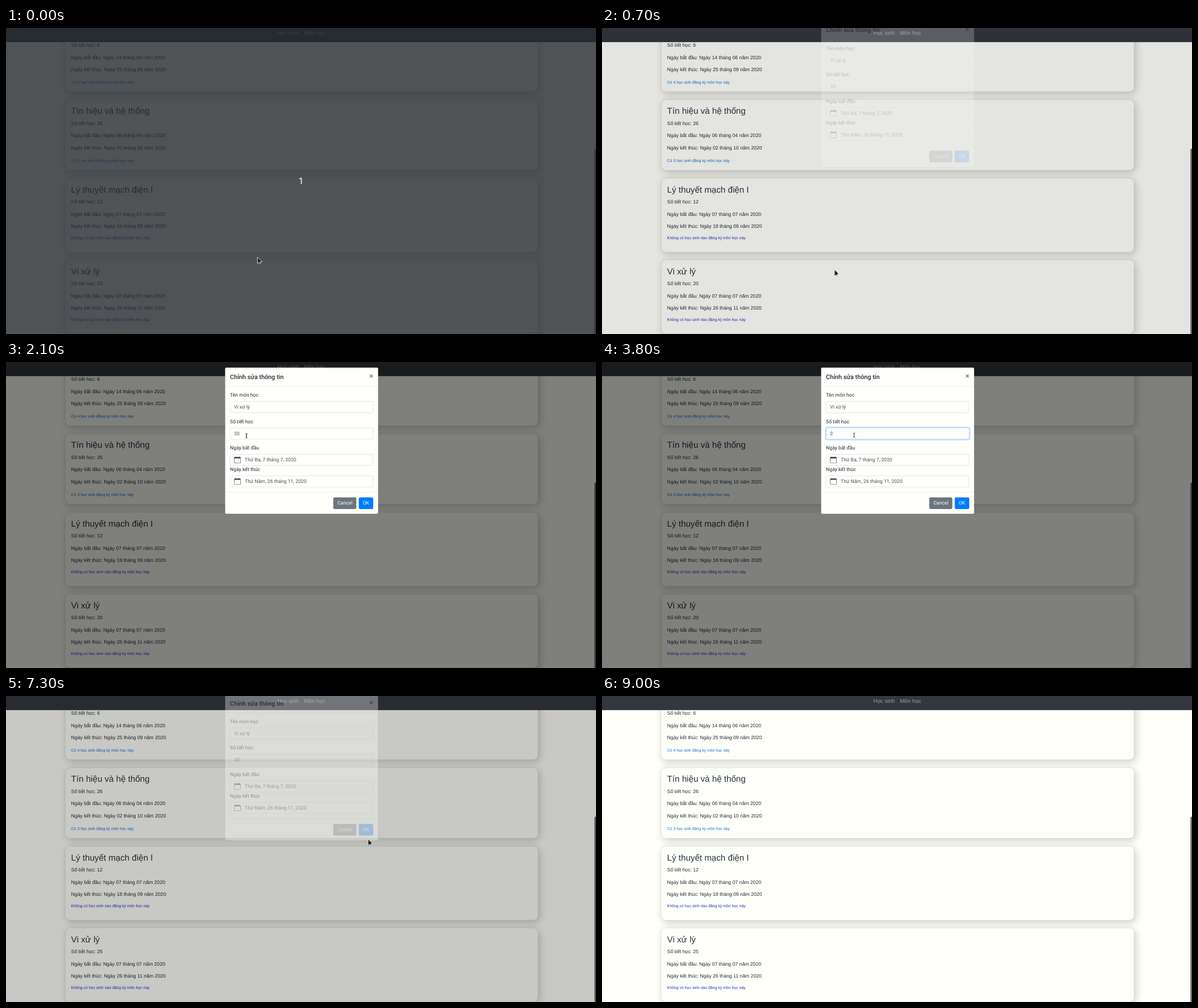
Write an HTML page that moves like this. It is 1038 px wide and 539 px high and loops after 9200 ms.

```html
<!DOCTYPE html>
<html lang="vi">
<head>
<meta charset="utf-8">
<title>Môn học</title>
<style>
* { box-sizing: border-box; }
html, body { margin: 0; width: 100%; height: 100%; overflow: hidden; background: #fffffa; }
body { position: relative; }
#screen {
  position: absolute; left: 0; top: 0; width: 1920px; height: 997px; overflow: hidden;
  transform: scale(.540625); transform-origin: 0 0; background: #fffffa;
  font: 16px/24px "Liberation Sans", Arial, sans-serif; color: #232b33;
  text-rendering: geometricPrecision; white-space: nowrap;
}
#screen > *, .card > * { position: absolute; }
.card {
  left: 192px; width: 1540px; border: 1px solid #d3d3cf; border-radius: 16px;
  background: #fffffa; box-shadow: 5px 6px 26px rgba(0, 0, 0, .2);
}
.card > * { left: 19px; margin: 0; }
.card h3 { top: 20.4px; font-size: 28px; line-height: 34px; font-weight: 400; color: #263442; }
.card small { font-size: 12.8px; color: #0a6ed1; }
.card small.none { color: #1a30c0; }
nav { left: 0; top: 0; width: 1920px; height: 46px; background: #33383f; font-size: 18px; color: #999c9f; }
nav span { position: absolute; top: 4px; }
#bar { left: 1915px; top: 393px; width: 6px; height: 620px; border-radius: 3px; background: #6a6a6c; }
#shade { inset: 0; background: #000; }
#modal {
  left: 712px; top: 17px; width: 500px; border: 1px solid rgba(0, 0, 0, .2); border-radius: 5px;
  background: #fffffc; background-clip: padding-box; font-family: Roboto, sans-serif;
}
header { position: relative; height: 62px; padding: 16px; border-bottom: 1px solid #dee2e6; font-size: 20px; line-height: 29px; font-weight: 500; }
header b { position: absolute; right: 16px; top: 16px; font-size: 24px; line-height: 24px; opacity: .5; color: #000; }
main { padding: 16px; }
label { display: block; }
.text { margin-top: 8px; }
.field {
  height: 38px; padding: 6px 12px; border: 1px solid #ced4da; border-radius: 4px; color: #495057;
  margin-bottom: 16px; display: flex; align-items: center;
}
.date { margin: 8px 0 0; }
.field svg { width: 22px; height: 22px; margin-right: 13px; }
#caret { width: 1.6px; height: 20px; margin-right: -1.6px; background: #222; }
footer { display: flex; justify-content: flex-end; gap: 8px; padding: 16px; border-top: 1px solid #dee2e6; }
footer span { padding: 7px 13px; height: 38px; border-radius: 4px; background: #6c757d; color: #fff; }
#veil { inset: 0; background: rgba(35, 40, 46, .8); color: #fff; text-align: center; font: 30px/997px Roboto, sans-serif; }
#cursor { position: absolute; left: 0; top: 0; width: 20px; height: 20px; overflow: visible; }
#cursor g { stroke-linejoin: round; }
</style>
</head>
<body>
<div id="screen">
  <nav><span style="left:883px">Học sinh</span><span style="left:969.5px">Môn học</span></nav>
  <div id="bar"></div>
  <div id="shade"></div>
  <div id="modal">
    <header>Chỉnh sửa thông tin<b>×</b></header>
    <main>
      <label>Tên môn học</label><div class="field text">Vi xử lý</div>
      <label>Số tiết học</label><div class="field text" id="count"><span id="value"></span><i id="caret"></i></div>
      <label>Ngày bắt đầu</label><div class="field date">Thứ Ba, 7 tháng 7, 2020</div>
      <label>Ngày kết thúc</label><div class="field date">Thứ Năm, 26 tháng 11, 2020</div>
    </main>
    <footer><span id="cancel">Cancel</span><span id="ok">OK</span></footer>
  </div>
  <div id="veil">1</div>
</div>
<svg id="cursor">
  <g id="arrow"><path d="M0 0V11.4L2.8 9.2L4 11.4L5.6 10.6L4.6 8.4L7.8 8Z" fill="#1c1c1e" stroke="#f4f4f0" stroke-width=".8"/></g>
  <g id="beam" fill="none"><path d="M-1.8-4Q0-4 0-2.8V2.8Q0 4-1.8 4M1.8-4Q0-4 0-2.8V2.8Q0 4 1.8 4" stroke="#333" stroke-width=".9"/></g>
  <g id="hand"><path d="M-1 0Q0-1 1 0V4L5 5Q6 5.4 5.8 7L5 10V11.5H-.5V10L-3.5 6.5Q-3.6 5-2.4 5.2L-1 6.4Z" fill="#1c1c1e" stroke="#f4f4f0" stroke-width=".8"/></g>
</svg>
<script>
const LOOP = 9200;
const $ = id => document.getElementById(id);
const clamp = v => Math.max(0, Math.min(1, v));
const within = (t, a, b) => t >= a && t < b;
const easeOut = x => 1 - Math.pow(1 - x, 1.7);

// top, height, title, lessons, start, end, students
const courses = [
  [-22, 230, '', 6, '14 tháng 06', '25 tháng 09', 4],
  [233, 231, 'Tín hiệu và hệ thống', 26, '06 tháng 04', '02 tháng 10', 3],
  [489, 242, 'Lý thuyết mạch điện I', 12, '07 tháng 07', '18 tháng 09', 0],
  [755, 242, 'Vi xử lý', '<span id="lessons"></span>', '07 tháng 07', '26 tháng 11', 0]
];
const cardHtml = ([top, height, title, lessons, start, end, n]) => {
  const rows = [`Số tiết học: ${lessons}`, `Ngày bắt đầu: Ngày ${start} năm 2020`, `Ngày kết thúc: Ngày ${end} năm 2020`]
    .map((row, i) => `<p style="top:${65.6 + 40 * i}px">${row}</p>`).join('');
  const note = n
    ? `<small style="top:187.4px">Có ${n} học sinh đăng ký môn học này</small>`
    : '<small class="none" style="top:183.2px">Không có học sinh nào đăng ký môn học này</small>';
  return `<div class="card" style="top:${top}px;height:${height}px"><h3>${title}</h3>${rows}${note}</div>`;
};
$('screen').insertAdjacentHTML('afterbegin', courses.map(cardHtml).join(''));

const icon = `<svg viewBox="0 0 16 16" fill="none" stroke="#343a40">
  <rect x=".5" y="1.5" width="15" height="14" rx="1.5"/><path d="M1 3H15" stroke-width="2.4"/><path d="M3.5 0V2M12.5 0V2"/></svg>`;
document.querySelectorAll('.date').forEach(el => el.insertAdjacentHTML('afterbegin', icon));

// pointer path: time, x, y
const path = [
  [0, 442.5, 403.5], [300, 409, 425.5], [900, 409, 425.5], [1600, 468, 112], [1900, 465, 94],
  [2100, 423, 130], [2400, 421.5, 136], [2900, 421.5, 136], [3200, 443.5, 129], [4700, 443.5, 129],
  [5200, 654, 287], [5500, 637, 250], [5700, 639.5, 253], [6400, 639.5, 253], [6500, 638, 253],
  [7100, 638, 253], [7200, 637, 252], [7400, 637, 252], [8100, 915, 272], [8900, 19, 2], [LOOP, 19, 2]
];
function pointer(t) {
  const i = path.findIndex(p => p[0] > t);
  const [t0, x0, y0] = path[i - 1], [t1, x1, y1] = path[i];
  const k = (t - t0) / (t1 - t0);
  return [x0 + (x1 - x0) * k, y0 + (y1 - y0) * k];
}

const blinks = [[2700, 3200], [3900, 4500], [5100, 5700], [6300, 6900]];

function draw(t) {
  $('veil').style.display = t < 100 ? '' : 'none';

  // 150 ms fade, 300 ms slide; the backdrop starts to close just after the dialog
  const closing = t >= 7200;
  const opened = t < 700 ? 0 : 32 + (t - 700) * .63;
  const fade = lag => closing ? 1 - clamp((t - 7202 - lag) / 150) : clamp(opened / 150);
  const slide = closing ? easeOut(clamp((t - 7202) / 300)) : 1 - easeOut(clamp(opened / 300));
  $('shade').style.opacity = fade(13) / 2;
  $('modal').style.opacity = fade(0);
  $('modal').style.transform = `translateY(${-50 * slide}px)`;

  const dim = closing || t < 1000 ? .65 : .65 + .35 * clamp((t - 950) / 150);
  $('cancel').style.opacity = $('ok').style.opacity = dim;
  const pressed = within(t, 7100, 7200);
  $('ok').style.background = pressed ? '#0062cc' : within(t, 5400, 7100) ? '#0069d9' : '#007bff';
  $('ok').style.boxShadow = pressed ? '0 0 0 3px rgba(38,143,255,.5)' : 'none';

  const focus = t < 7100 ? clamp((t - 2550) / 150) : 0;
  $('count').style.borderColor = focus ? '#80bdff' : '';
  $('count').style.boxShadow = `0 0 0 3.2px rgba(0,123,255,${.25 * focus})`;
  $('value').textContent = t < 3800 ? '20' : t < 4000 ? '2' : '25';
  $('caret').style.opacity = blinks.some(([a, b]) => within(t, a, b)) ? 1 : 0;
  $('lessons').textContent = closing ? '25' : '20';

  const [x, y] = pointer(t);
  const shape = within(t, 1800, 4900) ? 'beam' : within(t, 5400, 7200) ? 'hand' : 'arrow';
  for (const id of ['arrow', 'beam', 'hand']) $(id).style.display = id === shape ? '' : 'none';
  $('cursor').style.transform = `translate(${x}px,${y}px)`;
  $('cursor').style.display = t < 9000 ? '' : 'none';
}

const begin = performance.now();
function tick() {
  const t = (performance.now() - begin) % LOOP;
  draw(Math.floor(t / 100) * 100);
  requestAnimationFrame(tick);
}
tick();
</script>
</body>
</html>
```
